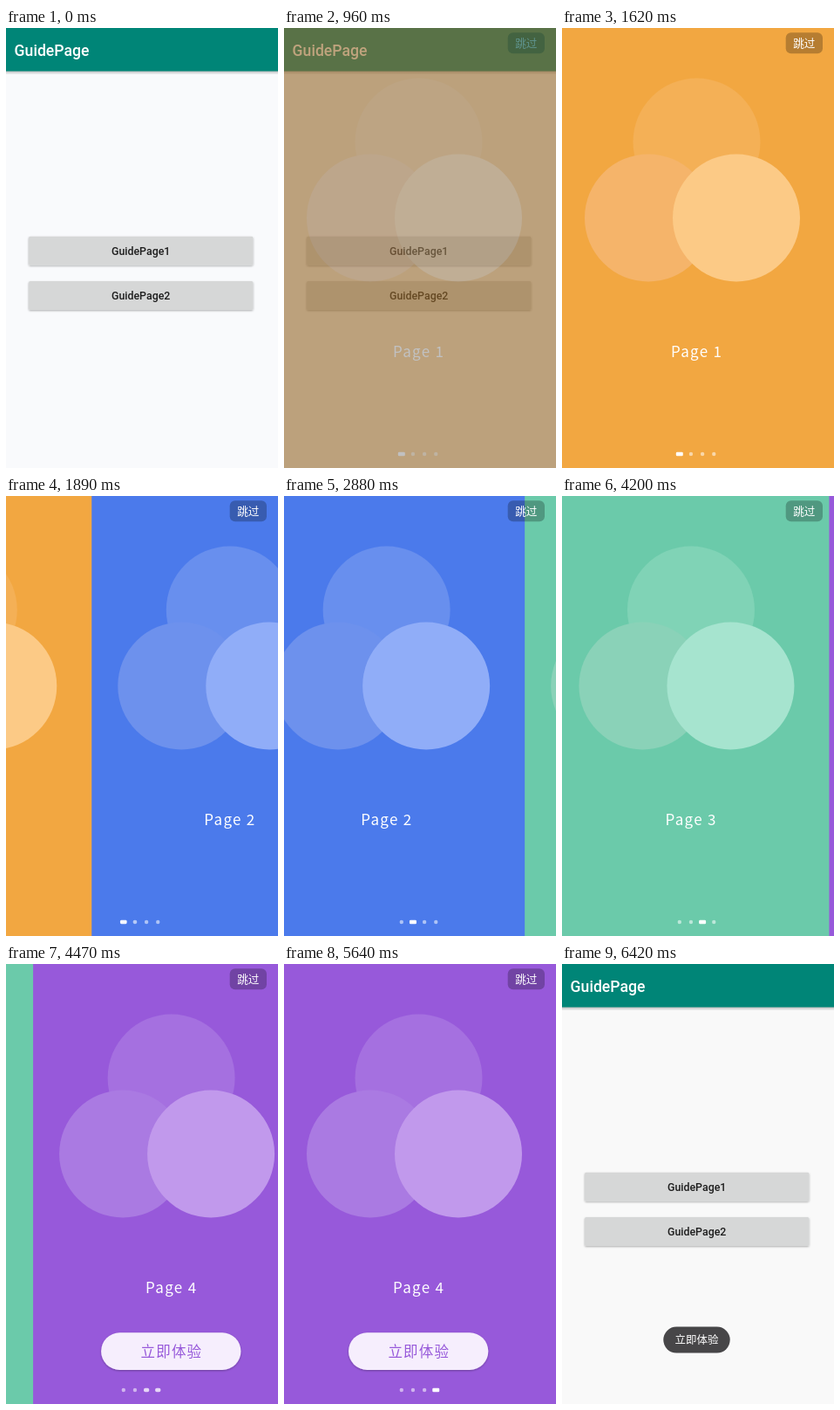
An HTML page for the animation above (7500 ms loop, 312 by 504 pixels).

```html
<!DOCTYPE html>
<html lang="en">
<head>
<meta charset="utf-8">
<title>GuidePage</title>
<style>
  html, body { margin: 0; width: 100%; height: 100%; overflow: hidden; background: #000; }
  svg { display: block; width: 100vw; height: 100vh; }
  .ui { font-family: Roboto, sans-serif; font-weight: 500; }
  .cjk { font-family: "Noto Sans CJK SC", "Noto Sans CJK JP", "Noto Sans CJK", sans-serif; }
</style>
</head>
<body>
<svg viewBox="0 0 312 504">
  <defs>
    <linearGradient id="fall" x1="0" y1="0" x2="0" y2="1">
      <stop offset="0" stop-color="#000" stop-opacity=".26"/>
      <stop offset="1" stop-color="#000" stop-opacity="0"/>
    </linearGradient>
    <filter id="soft" x="-10%" y="-30%" width="120%" height="170%">
      <feDropShadow dx="0" dy="1" stdDeviation=".9" flood-color="#000" flood-opacity=".3"/>
    </filter>
    <clipPath id="key"><rect x="26" y="238.7" width="257.5" height="33" rx="1.8"/></clipPath>
  </defs>
  <rect width="312" height="504"/>

  <g id="home">
    <rect id="paper" width="312" height="504"/>
    <rect y="49" width="312" height="4.5" fill="url(#fall)"/>
    <rect width="312" height="49.5" fill="#008577"/>
    <text class="ui" x="9.6" y="31.9" font-size="17.64" fill="#fff">GuidePage</text>
    <g fill="#d6d7d7" filter="url(#soft)">
      <rect x="26" y="238.7" width="257.5" height="33" rx="1.8"/>
      <rect x="26" y="290" width="257.5" height="33" rx="1.8"/>
    </g>
    <g clip-path="url(#key)"><circle id="ripple" cx="154.5" cy="255" r="0"/></g>
    <g class="ui" font-size="12.35" fill="#1d1d1d" text-anchor="middle">
      <text x="154.7" y="259.8">GuidePage1</text>
      <text x="154.7" y="310.9">GuidePage2</text>
    </g>
  </g>

  <g id="guide">
    <g id="strip"></g>
    <rect x="256.7" y="5.3" width="42.3" height="24" rx="6" fill-opacity=".25"/>
    <text class="cjk" x="277.8" y="22" font-size="12.6" fill="#fff" text-anchor="middle">跳过</text>
    <g id="dots" fill="#fff"></g>
  </g>

  <g id="toast">
    <rect x="116.3" y="415.6" width="76.4" height="30" rx="15" fill="#474648"/>
    <text class="cjk" x="154.5" y="435.3" font-size="12.5" fill="#fff" text-anchor="middle">立即体验</text>
  </g>
</svg>
<script>
const LOOP = 7500, PAGE_W = 317, DOTS = 4;
const $ = id => document.getElementById(id);
const set = (el, attrs) => { for (const k in attrs) el.setAttribute(k, attrs[k]); };
const ramp = (t, from, to) => Math.min(1, Math.max(0, (t - from) / (to - from)));
const smooth = u => (1 - Math.cos(Math.PI * u)) / 2;

// background, top circle, left circle, right circle
const PALETTE = [
  ['#f2a741', '#f4b056', '#f5b46a', '#fcca86'],
  ['#4b7aeb', '#688fee', '#6d91ed', '#90adf8'],
  ['#6bcaaa', '#80d3b6', '#8ad2b8', '#a6e4cf'],
  ['#9759da', '#a570e0', '#aa7ae2', '#c199ec']
];
const CIRCLES = [[154.5, 130.5], [99, 217.5], [200, 217.5]];

const startButton = `
  <rect x="74" y="422.3" width="160.3" height="42.6" rx="21.3" fill="#f6eefd" filter="url(#soft)"/>
  <text class="cjk" x="119.4" y="449.7" font-size="16.5" letter-spacing="1.2" fill="#9759da">立即体验</text>`;

$('strip').innerHTML = PALETTE.map(([bg, ...fills], i) => `
  <g transform="translate(${i * PAGE_W} 0)">
    <rect x="-4" width="${PAGE_W + 1}" height="504" fill="${bg}"/>
    ${CIRCLES.map(([x, y], k) => `<circle cx="${x}" cy="${y}" r="73" fill="${fills[k]}"/>`).join('')}
    <text class="cjk" x="125" y="377.4" font-size="17" letter-spacing="1.3" fill="#fff">Page ${i + 1}</text>
    ${i === DOTS - 1 ? startButton : ''}
  </g>`).join('');
$('dots').innerHTML = '<rect y="485.8" height="4.4"/>'.repeat(DOTS);
const dots = [...$('dots').children];

// A drag covers part of the way, then the page settles after release.
const SWIPES = [
  { at: 1620, release: 1830, end: 2340, dragged: .39 },
  { at: 2820, release: 2940, end: 3310, dragged: .45 },
  { at: 4170, release: 4320, end: 4890, dragged: .484 }
];
function swipePos(s, t) {
  if (t < s.release) return s.dragged * ramp(t, s.at, s.release) ** 2;
  return 1 - (1 - s.dragged) * (1 - ramp(t, s.release, s.end)) ** 5;
}

function render(t) {
  const opening = smooth(ramp(t, 795, 1195));
  const closing = smooth(ramp(t, 5800, 6240));
  const leaving = t > 5000;
  set($('home'), { opacity: leaving ? 1 / (2 - closing) : 1 - opening });
  set($('guide'), { opacity: leaving ? (1 - closing) ** 2 : opening });
  set($('paper'), { fill: leaving ? '#f9f9f9' : '#f9fafc' });

  const press = ramp(t, 570, 780);
  set($('ripple'), { r: 135 * press, opacity: .1 * (1 - ramp(t, 720, 900)) });

  let pos = 0, mark = 0;
  for (const s of SWIPES) {
    pos += swipePos(s, t);
    mark += smooth(ramp(t, s.release, s.release + 300));
  }
  set($('strip'), { transform: `translate(${-pos * PAGE_W} 0)` });

  dots.forEach((dot, i) => {
    const on = Math.max(0, 1 - Math.abs(mark - i));
    const w = 4.4 + 3.6 * on;
    set(dot, { x: 134.8 + 13.15 * i - w / 2, width: w, rx: 2.2 - .9 * on, opacity: .55 + .42 * on });
  });

  set($('toast'), { opacity: 1 - (1 - ramp(t, 5830, 6240)) ** 2 });
}

const begin = performance.now();
function tick() {
  render((performance.now() - begin) % LOOP);
  requestAnimationFrame(tick);
}
tick();
</script>
</body>
</html>
```
